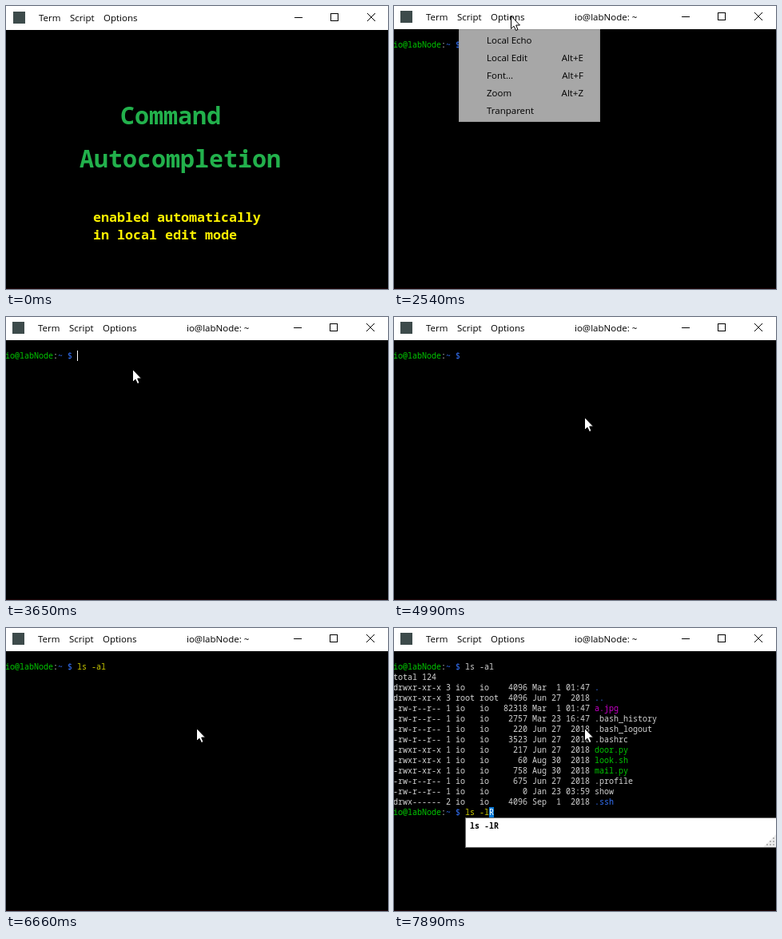
These frames come from a looping animation (478x354 px, 8000 ms). An HTML page with a canvas:

```html
<!DOCTYPE html>
<html lang="en">
<head>
<meta charset="utf-8">
<title>Command autocompletion</title>
<style>
  html, body { margin: 0; width: 100%; height: 100%; overflow: hidden; background: #000; }
  canvas { display: block; width: 478px; height: 354px; }
</style>
</head>
<body>
<canvas id="stage" width="478" height="354"></canvas>
<script>
const ctx = document.getElementById('stage').getContext('2d');
const LOOP = 8000, W = 478, H = 354;
const CELL = 6, LINE = 13;
const MONO = '"Noto Sans Mono", monospace';
const UI = '11.5px "Open Sans", sans-serif';
const GREEN = '#00c800', BLUE = '#3370f5', YELLOW = '#cdcd00', GREY = '#d2d2d2', MAGENTA = '#c800c8';
const SELECT = '#0078d7';

const USER = 'io', HOST = 'labNode';
const COMMANDS = ['ls', 'ls -al', 'ls -arl', 'ls -lR'];
const MENU = [['Local Echo'], ['Local Edit', 'Alt+E'], ['Font...', 'Alt+F'], ['Zoom', 'Alt+Z'], ['Tranparent']];

// mode, links, owner, size, date, name, colour
const FILES = [
  ['drwxr-xr-x', 3, USER, 4096, 'Mar  1 01:47', '.', BLUE],
  ['drwxr-xr-x', 3, 'root', 4096, 'Jun 27  2018', '..', BLUE],
  ['-rw-r--r--', 1, USER, 82318, 'Mar  1 01:47', 'a.jpg', MAGENTA],
  ['-rw-r--r--', 1, USER, 2757, 'Mar 23 16:47', '.bash_history', GREY],
  ['-rw-r--r--', 1, USER, 220, 'Jun 27  2018', '.bash_logout', GREY],
  ['-rw-r--r--', 1, USER, 3523, 'Jun 27  2018', '.bashrc', GREY],
  ['-rwxr-xr-x', 1, USER, 217, 'Jun 27  2018', 'door.py', GREEN],
  ['-rwxr-xr-x', 1, USER, 60, 'Aug 30  2018', 'look.sh', GREEN],
  ['-rwxr-xr-x', 1, USER, 758, 'Aug 30  2018', 'mail.py', GREEN],
  ['-rw-r--r--', 1, USER, 675, 'Jun 27  2018', '.profile', GREY],
  ['-rw-r--r--', 1, USER, 0, 'Jan 23 03:59', 'show', GREY],
  ['drwx------', 2, USER, 4096, 'Sep  1  2018', '.ssh', BLUE]
];

// time, typed text, inline completion, popup shown
const TYPING = [
  [5550, 'l', 's', true],
  [5650, 'ls ', '-al', true],
  [5870, 'ls -', 'al', true],
  [6110, 'ls -al', '', false],
  [6880, '', '', false],
  [7430, 'l', 's', true],
  [7550, 'ls', '', true],
  [7670, 'ls -', 'al', true],
  [7890, 'ls -l', 'R', true]
];

// time, x, y of the pointer tip
const POINTER = [
  [1640, 236, 336], [2080, 188, 150], [2420, 146, 12], [2540, 146, 12],
  [3096, 158, 65], [3660, 158, 65], [3990, 238, 125]
];

const within = (t, from, to) => t >= from && t < to;

function rect(x, y, w, h, color) {
  ctx.fillStyle = color;
  ctx.fillRect(x, y, w, h);
}

function label(text, x, y, color, font, align = 'left') {
  ctx.font = font;
  ctx.textAlign = align;
  ctx.fillStyle = color;
  ctx.fillText(text, x, y);
}

const colX = col => col * CELL - 1;
const rowY = row => 42 + row * LINE;

function term(text, col, row, color) {
  label(text, colX(col), rowY(row) + 10, color, '10px ' + MONO);
}

function titleBar(color, title) {
  rect(-1, -1, W + 1, 30, '#fff');
  rect(8, 6, 15, 15, '#3d4b4b');
  label('Term', 40, 18, color, UI);
  label('Script', 79, 18, color, UI);
  label('Options', 121, 18, color, UI);
  label(title, 226, 18, color, UI);
  rect(360, 13, 10, 1, color);
  ctx.strokeStyle = color;
  ctx.lineWidth = 1;
  ctx.strokeRect(405.5, 8.5, 9, 9);
  ctx.beginPath();
  ctx.moveTo(451, 8); ctx.lineTo(461, 18);
  ctx.moveTo(461, 8); ctx.lineTo(451, 18);
  ctx.stroke();
}

function titleCard() {
  ctx.save();
  ctx.translate(1, 1);
  titleBar('#000', '');
  ctx.restore();
  const big = 'bold 30px ' + MONO, small = 'bold 16.67px ' + MONO;
  label('Command', 143, 148, '#22b14c', big);
  label('Autocompletion', 92, 202, '#22b14c', big);
  label('enabled automatically', 109, 270, '#fff200', small);
  label('in local edit mode', 109, 292, '#fff200', small);
}

function prompt(row) {
  term(USER + '@' + HOST, 0, row, GREEN);
  term(':', 10, row, GREY);
  term('~ $', 11, row, BLUE);
}

function listing() {
  term('ls -al', 15, 0, GREY);
  term('total 124', 0, 1, GREY);
  FILES.forEach(([mode, links, owner, size, date, name, color], i) => {
    const who = owner.padEnd(5);
    term(`${mode} ${links} ${who}${who}${String(size).padStart(5)} ${date}`, 0, i + 2, GREY);
    term(name, 42, i + 2, color);
  });
}

function caret(col, row) {
  rect(colX(col), rowY(row), 1, LINE, '#fff');
}

function popup(top, items, hover) {
  const height = items.length * 18 + 20;
  rect(89, top, W - 89, height, '#6e6e6e');
  rect(90, top + 1, W - 90, height - 2, '#fff');
  items.forEach((item, i) => {
    const y = top + 1 + i * 18;
    if (i === hover) rect(90, y, W - 90, 18, SELECT);
    label(item, 95, y + 13, i === hover ? '#fff' : '#000', 'bold 10px ' + MONO);
  });
  const bottom = top + height - 1;
  ctx.fillStyle = '#ededed';
  ctx.beginPath();
  ctx.moveTo(W, bottom - 16); ctx.lineTo(W, bottom); ctx.lineTo(W - 16, bottom);
  ctx.fill();
  for (let i = 0; i < 3; i++)
    for (let j = 0; j <= i; j++)
      rect(W - 4 - j * 4, bottom - 12 + i * 4, 2, 2, '#b4b4b4');
}

function optionsMenu(pointerY) {
  rect(81, 29, 177, 116, '#9a9a9a');
  rect(82, 30, 175, 114, '#a7a7a7');
  MENU.forEach(([name, key], i) => {
    const y = 32 + i * 22, active = within(pointerY, y, y + 22);
    if (active) rect(83, y, 173, 22, SELECT);
    const color = active ? '#fff' : '#000';
    label(name, 116, y + 15, color, UI);
    if (key) label(key, 237, y + 15, color, UI, 'right');
  });
}

function pointerAt(time) {
  const t = 1640 + Math.floor((time - 1640) / 112) * 112;
  const next = POINTER.findIndex(p => p[0] > t);
  if (next < 1) return POINTER[POINTER.length - 1].slice(1);
  const [t0, x0, y0] = POINTER[next - 1], [t1, x1, y1] = POINTER[next];
  const k = (t - t0) / (t1 - t0);
  return [Math.round(x0 + (x1 - x0) * k), Math.round(y0 + (y1 - y0) * k)];
}

function pointer(x, y) {
  ctx.save();
  ctx.translate(x + 0.5, y + 0.5);
  ctx.beginPath();
  [[0, 0], [0, 16], [3.5, 12.7], [6, 18], [8.5, 17], [6.2, 11.5], [11, 11.5]]
    .forEach(([px, py]) => ctx.lineTo(px, py));
  ctx.closePath();
  ctx.fillStyle = '#fff';
  ctx.fill();
  ctx.strokeStyle = '#000';
  ctx.lineWidth = 1;
  ctx.stroke();
  ctx.restore();
}

function editLine(t, row) {
  const step = TYPING.filter(s => s[0] <= t).pop();
  if (!step) return;
  const [, typed, rest, open] = step;
  term(typed, 15, row, YELLOW);
  const col = 15 + typed.length;
  if (rest) {
    rect(colX(col), rowY(row), rest.length * CELL, LINE, SELECT);
    term(rest, col, row, '#fff');
  }
  if (open) {
    const items = COMMANDS.filter(c => c.startsWith(typed));
    popup(rowY(row) + LINE, items, t < 5650 ? 3 : -1);
  }
}

function terminal(t) {
  const active = t >= 2080;
  titleBar(active ? '#000' : '#999', `${USER}@${HOST}: ~`);
  prompt(0);
  const done = t >= 6880, row = done ? 14 : 0;
  if (done) listing();
  if (t >= 7000) prompt(14);
  editLine(t, row);

  if (within(t, 3440, 3990) || within(t, 4540, 4990) || within(t, 7000, 7430)) caret(15, row);
  if (within(t, 6110, 6660)) caret(21, 0);

  if (t < 1640) return;
  const [x, y] = pointerAt(t);
  if (within(t, 2540, 3440)) optionsMenu(y);
  const typingHides = within(t, 5650, 6110) || within(t, 7550, 7890);
  if (!typingHides) pointer(x, y);
}

function draw(now) {
  const t = now % LOOP;
  rect(0, 0, W, H, '#000');
  rect(0, H - 1, W, 1, '#1c0408');
  if (t < 1320) titleCard();
  else terminal(t);
  requestAnimationFrame(draw);
}

requestAnimationFrame(draw);
</script>
</body>
</html>
```
